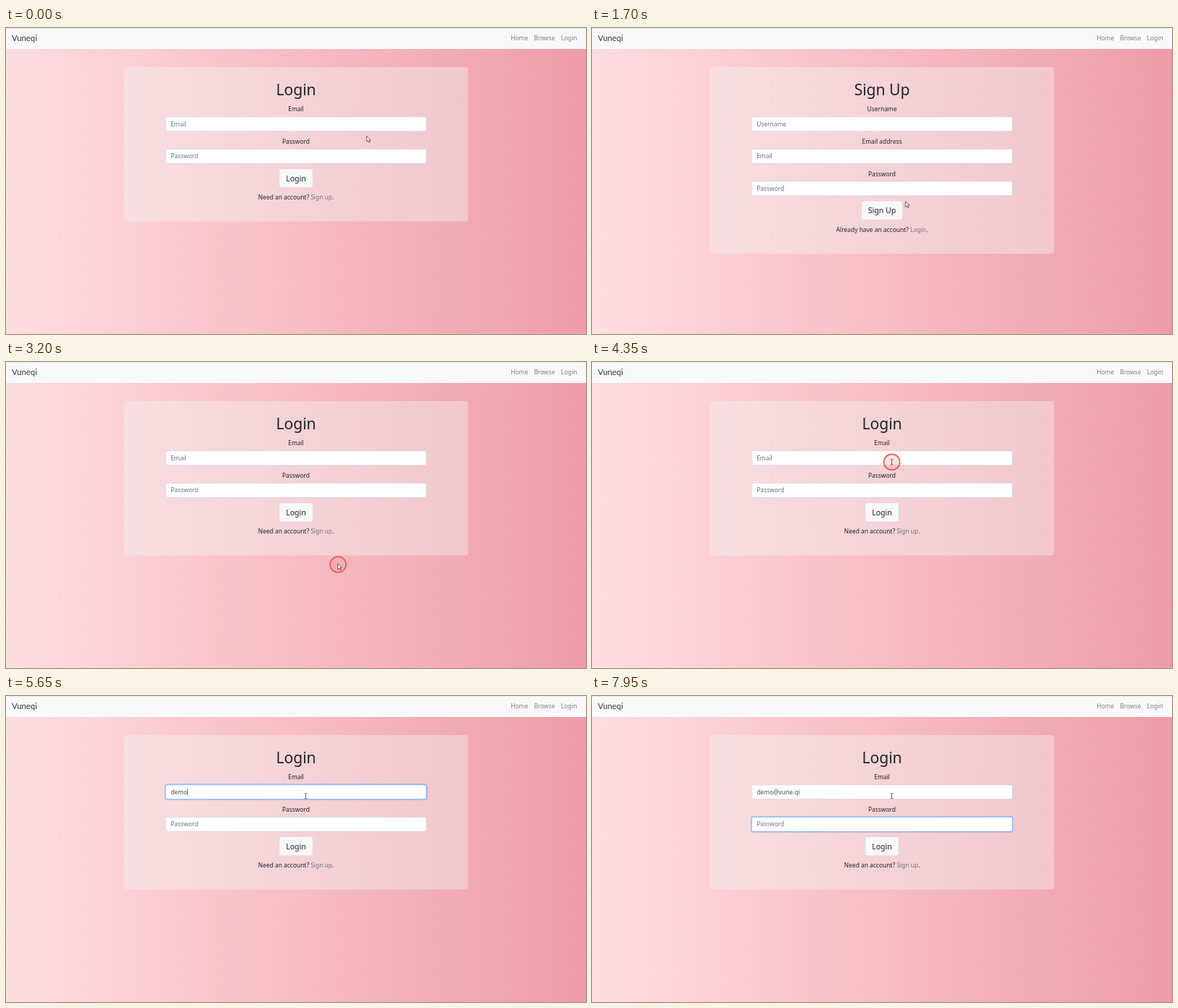
These frames come from a looping animation (800 px wide and 423 px high, 8000 ms). An HTML page:

```html
<!DOCTYPE html>
<html lang="en">
<head>
<meta charset="utf-8">
<title>Login form</title>
<style>
  html, body { margin: 0; width: 100%; height: 100%; overflow: hidden; }
  svg { display: block; width: 100vw; height: 100vh; }
  text { font: 8.42px "Noto Sans", "Open Sans", sans-serif; fill: #212529; }
  .mid { text-anchor: middle; }
  .title { font-size: 21.05px; }
  .action { font-size: 10.53px; }
  .nav { fill: #808182; }
  .hint, .link { fill: #6c757d; }
  .value { fill: #495057; }
  .brand { font: 11.4px Lato, sans-serif; fill: #3a3b3c; }
</style>
</head>
<body>
<svg id="stage" viewBox="0 0 800 423" preserveAspectRatio="none">
  <defs>
    <linearGradient id="pink">
      <stop offset="0" stop-color="#ffdde1"/>
      <stop offset="1" stop-color="#ee9ca7"/>
    </linearGradient>
  </defs>
  <rect width="800" height="423" fill="url(#pink)"/>
  <rect width="800" height="29" fill="#f8f9fa"/>
  <rect width="800" height="0.8" fill="#e6e9ec"/>
  <text class="brand" x="8" y="18">Vuneqi</text>
  <text class="nav" x="696.3" y="17.4">Home</text>
  <text class="nav" x="728.2" y="17.4">Browse</text>
  <text class="nav" x="765.6" y="17.4">Login</text>
  <g id="login"></g>
  <g id="signup"></g>
  <rect id="caret" width="0.7" height="9.6" y="128" fill="#495057"/>
  <circle id="ring" r="11" fill="#ff7878" fill-opacity="0.2" stroke="#f0584c" stroke-width="1.6"/>
  <g id="pointer" stroke-linejoin="round">
    <path id="arrow" d="M0 0V7.6L1.8 6.1L3.1 8.9L4.5 8.3L3.2 5.5H5.6Z"
          fill="#fff" stroke="#3c3c3c" stroke-width="0.8"/>
    <path id="hand" d="M-1 0.6Q0 -0.8 1 0.6V3.6L4.2 4.4Q5 4.8 4.8 6L4.2 9H0L-2.6 5.6Q-2.4 4.4 -1 5.4Z"
          fill="#fff" stroke="#3c3c3c" stroke-width="0.8"/>
    <path id="beam" d="M-2 -3.6H-0.5L0 -3.2L0.5 -3.6H2M0 -3.2V3.2M-2 3.6H-0.5L0 3.2L0.5 3.6H2"
          fill="none" stroke="#4a4a4a" stroke-width="0.8"/>
  </g>
</svg>
<script>
const LOOP = 8000, STEP = 50, ROW = 44.6;
const $ = id => document.getElementById(id);

function add(parent, tag, attrs, text = "") {
  const el = document.createElementNS("http://www.w3.org/2000/svg", tag);
  for (const key in attrs) el.setAttribute(key, attrs[key]);
  el.textContent = text;
  parent.append(el);
  return el;
}

function show(el, on) {
  el.style.display = on ? "" : "none";
}

// Builds one form card and returns the parts that change.
function buildForm(group, form) {
  const bottom = 133 + form.fields.length * ROW;
  add(group, "rect", { x: 162.7, y: 54, width: 474.6, height: bottom - 8.7, rx: 4,
    fill: "#f1f1ef", "fill-opacity": 0.42 })
    .setAttribute("height", bottom + 45.3 - 54);
  add(group, "text", { class: "mid title", x: 400, y: 93.2 }, form.title);

  const fields = form.fields.map(([label, hint], i) => {
    const y = 122.9 + i * ROW;
    const box = { x: 220.4, y, width: 359.2, height: 19.6, rx: 2 };
    add(group, "text", { class: "mid", x: 400, y: y - 7.5 }, label);
    const glow = add(group, "rect", { ...box, fill: "none", stroke: "#007bff",
      "stroke-opacity": 0.3, "stroke-width": 3.2 });
    const frame = add(group, "rect", { ...box, fill: "#fff", "stroke-width": 0.6 });
    const text = add(group, "text", { x: 227.2, y: y + 12.9 });
    return { glow, frame, text, hint };
  });

  const half = form.buttonWidth / 2;
  add(group, "rect", { x: 400 - half, y: bottom - 27.2 , width: 2 * half, height: 25.2,
    rx: 2.5, fill: "#f8f9fa" });
  add(group, "text", { class: "mid action", x: 400, y: bottom - 10.4 }, form.title);
  const foot = add(group, "text", { class: "mid", x: 400, y: bottom + 15.2 });
  foot.append(form.ask + " ");
  add(foot, "tspan", { class: "link" }, form.link);
  foot.append(".");
  return fields;
}

function setField(field, value, focus) {
  field.text.textContent = value || field.hint;
  field.text.setAttribute("class", value ? "value" : "hint");
  field.frame.setAttribute("stroke", focus > 0.5 ? "#80bdff" : "#ced4da");
  field.glow.setAttribute("opacity", focus);
}

const loginFields = buildForm($("login"), {
  title: "Login", buttonWidth: 45.4, ask: "Need an account?", link: "Sign up",
  fields: [["Email", "Email"], ["Password", "Password"]]
});
const signupFields = buildForm($("signup"), {
  title: "Sign Up", buttonWidth: 56, ask: "Already have an account?", link: "Login",
  fields: [["Username", "Username"], ["Email address", "Email"], ["Password", "Password"]]
});
signupFields.forEach(field => setField(field, "", 0));

// Pointer stops: time, x, y
const path = [
  [0, 497.6, 149.4], [300, 452, 229], [480, 452, 229], [1050, 432.3, 239.8],
  [2030, 432.3, 239.8], [2700, 457.6, 279], [3450, 457.6, 279], [4150, 413.5, 138.4]
];
// Clicks: time, duration, x, y
const clicks = [[1200, 400, 433, 240], [2900, 400, 458, 280], [4350, 350, 413.5, 138.4]];

const address = "demo@vune.qi";
const keys = [5200, 5300, 5450, 5600, 6150, 6350, 6450, 6550, 6700, 6950, 7100, 7250];
const emailFocus = 4450, passwordFocus = 7750;

function pointerAt(t) {
  const i = path.findIndex(stop => stop[0] > t);
  if (i < 0) return path[path.length - 1].slice(1);
  const [t0, x0, y0] = path[i - 1], [t1, x1, y1] = path[i];
  const k = (t - t0) / (t1 - t0);
  return [x0 + (x1 - x0) * k, y0 + (y1 - y0) * k];
}

const ramp = (t, start) => Math.min(1, Math.max(0, (t - start) / 150));
const inside = (x, y, left, top, right, bottom) =>
  x >= left && x <= right && y >= top && y <= bottom;

function drawPointer(t, signup) {
  const [x, y] = pointerAt(t);
  const rows = signup ? 3 : 2;
  const overLink = signup ? inside(x, y, 439, 273, 461, 285) : inside(x, y, 420, 229, 450, 241);
  let overField = false;
  for (let i = 0; i < rows; i++) {
    overField ||= inside(x, y, 220, 123 + i * ROW, 580, 142.5 + i * ROW);
  }
  $("pointer").setAttribute("transform", `translate(${x} ${y})`);
  show($("hand"), overLink);
  show($("beam"), overField);
  show($("arrow"), !overLink && !overField);

  const click = clicks.find(([start, length]) => t >= start && t < start + length);
  show($("ring"), click);
  if (click) {
    $("ring").setAttribute("cx", click[2]);
    $("ring").setAttribute("cy", click[3]);
  }
}

function render(t) {
  const signup = t >= 1400 && t < 3100;
  show($("login"), !signup);
  show($("signup"), signup);

  const typed = keys.filter(key => key <= t).length;
  const [email, password] = loginFields;
  const leaving = ramp(t, passwordFocus);
  setField(email, address.slice(0, typed), ramp(t, emailFocus) - leaving);
  setField(password, "", leaving);

  const blinkOn = Math.floor((t - keys[typed - 1]) / 500) % 2 === 0;
  const caretOn = typed > 0 && t < passwordFocus && blinkOn;
  show($("caret"), caretOn);
  if (caretOn) $("caret").setAttribute("x", 227.4 + email.text.getComputedTextLength());

  drawPointer(t, signup);
}

function tick(now) {
  render(Math.floor(now % LOOP / STEP) * STEP);
  requestAnimationFrame(tick);
}
render(0);
requestAnimationFrame(tick);
</script>
</body>
</html>
```
